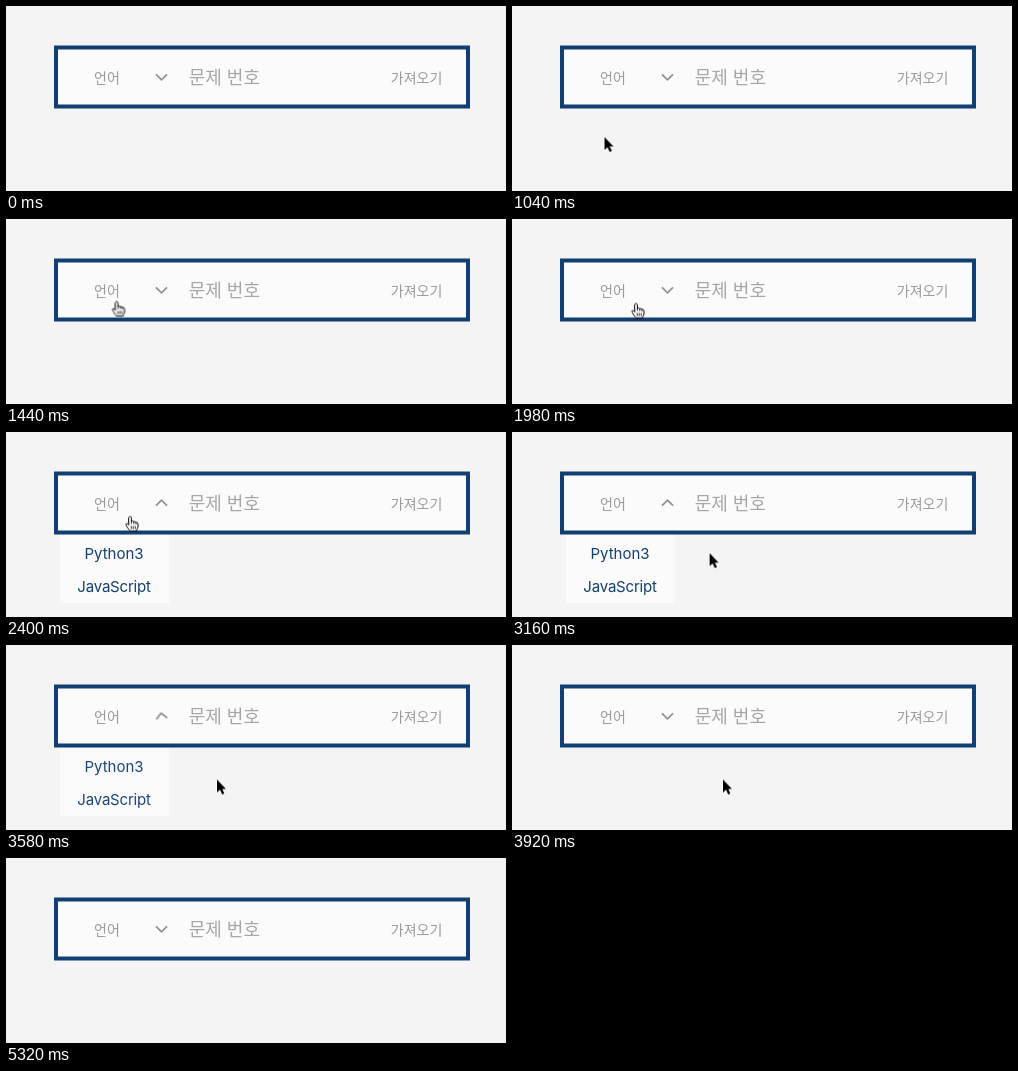
Animation of 500 by 185 pixels, one loop 5.4 s. Source, as an HTML page:

```html
<!DOCTYPE html>
<html lang="ko">
<head>
<meta charset="utf-8">
<title>언어 선택</title>
<style>
  html, body { margin: 0; width: 100%; height: 100%; overflow: hidden; background: #f4f4f4; }
  svg { display: block; width: 500px; height: 185px; }
  text { font-family: "Noto Sans CJK KR", "Noto Sans CJK", sans-serif; }
  .label { font-size: 14px; fill: #9a9a9a; }
  .hint { font-size: 18px; font-weight: 300; fill: #a6a6a6; }
  .item { font-family: Inter, sans-serif; font-size: 15px; fill: #123f70; text-anchor: middle; }
  .long { letter-spacing: -.2px; }

  .menu, .chevron, .pointer, .arrow, .hand { animation: 5400ms linear infinite; }
  .menu { animation-name: menu; }
  .chevron { animation-name: flip; transform-origin: 155.5px 71px; }
  .pointer { animation-name: travel; }
  .arrow { animation-name: arrow; animation-timing-function: step-end; }
  .hand { animation-name: hand; animation-timing-function: step-end; }

  @keyframes menu {
    0%, 36.667% { opacity: 0; animation-timing-function: ease; }
    44.444% { opacity: 1; }
    65.926% { opacity: 1; animation-timing-function: ease; }
    72.593%, 100% { opacity: 0; }
  }
  @keyframes flip {
    0%, 36.667% { transform: rotate(0deg); animation-timing-function: ease; }
    44.444% { transform: rotate(180deg); }
    65.926% { transform: rotate(180deg); animation-timing-function: ease; }
    72.593%, 100% { transform: rotate(0deg); }
  }
  @keyframes travel {
    0%, 10.7% { transform: translate(97px, 184px); animation-timing-function: ease-out; }
    19.259% { transform: translate(92.5px, 131px); animation-timing-function: ease-in; }
    20.741% { transform: translate(86px, 101px); }
    21.111% { transform: translate(86px, 98px); animation-timing-function: ease-out; }
    26.667% { transform: translate(110.5px, 82.5px); }
    30.741%, 31.852% { transform: translate(122px, 84px); }
    33.333%, 52.593% { transform: translate(124px, 84.5px); }
    58.519% { transform: translate(197.5px, 121px); animation-timing-function: ease-out; }
    62.593%, 75.741% { transform: translate(211px, 134.5px); }
    75.926% { transform: translate(210px, 148px); }
    76.296%, 100% { transform: translate(208px, 170px); }
  }
  @keyframes arrow {
    0% { visibility: hidden; }
    10.741% { visibility: visible; }
    21.111% { visibility: hidden; }
    55.76% { visibility: visible; }
    76.667%, 100% { visibility: hidden; }
  }
  @keyframes hand {
    0% { visibility: hidden; }
    21.111% { visibility: visible; }
    55.76%, 100% { visibility: hidden; }
  }
</style>
</head>
<body>
<svg viewBox="0 0 500 185">
  <rect x="50" y="41.5" width="412" height="59" fill="#fbfbfb" stroke="#123f73" stroke-width="4"/>
  <text class="label" x="88" y="76.5">언어</text>
  <path class="chevron" d="M150 68.3 L155.5 73.8 L161 68.3" fill="none" stroke="#919191" stroke-width="1.8"/>
  <text class="hint" x="182.7" y="77.5">문제 번호</text>
  <text class="label" x="384.8" y="76.5">가져오기</text>

  <g class="menu">
    <rect x="54" y="103" width="109" height="68" fill="#fbfbfb"/>
    <text class="item" x="108" y="127">Python3</text>
    <text class="item long" x="108" y="160">JavaScript</text>
  </g>

  <g class="pointer" stroke-linejoin="round">
    <path class="arrow" d="M0 0 V13 L3 10.3 L5.2 15 L7.4 14 L5.3 9.5 H9 Z" fill="#000" stroke="#fff" stroke-width="1.6" paint-order="stroke"/>
    <g class="hand" stroke="#000" stroke-linecap="round">
      <path d="M-1.4 1.3 C-1.4 -.3 1.4 -.3 1.4 1.3 V5 C1.6 4.2 3.6 4.3 3.8 5.5 C4.2 4.8 5.8 5 6 6.2 C6.6 5.6 8 6 8 7.4 V10 C8 12 6.6 12.6 6.6 14.5 H-.2 C-.4 13.4 -1.8 12.6 -2.4 11.2 C-3 9.8 -4.3 8.6 -4 7.6 C-3.6 6.6 -2.2 7 -1.4 8.2 Z" fill="#fff"/>
      <path d="M1.4 5 V7 M3.8 5.5 V7.2 M6 6.2 V7.5 M1.2 9.8 V12.3 M3.2 9.8 V12.3 M5.2 9.8 V12.3" fill="none" stroke-width=".8"/>
    </g>
  </g>
</svg>
</body>
</html>
```
